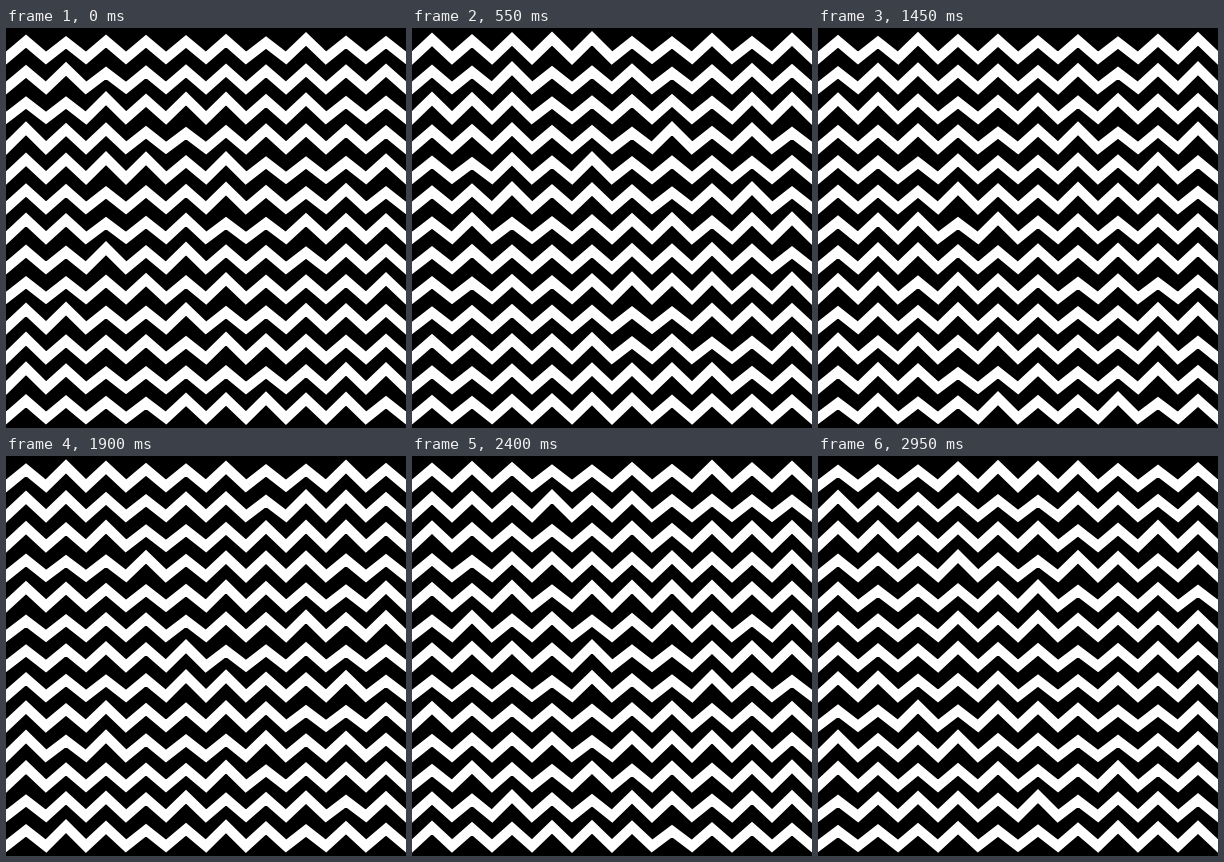
An HTML page that plays this animation: 400 by 400 pixels, repeating every 3000 ms.

```html
<!DOCTYPE html>
<html lang="en">
<head>
<meta charset="utf-8">
<title>Jittering zigzags</title>
<style>
  html, body { margin: 0; width: 100%; height: 100%; overflow: hidden; background: #000; }
  svg { display: block; width: 100%; height: 100%; }
  path { fill: none; stroke: #fff; stroke-width: 10; stroke-linejoin: miter; stroke-miterlimit: 10; }
</style>
</head>
<body>
<svg viewBox="0 0 400 400"><path id="zigzags"/></svg>
<script>
const LOOP = 3000, STEP = 50;
const ROWS = 13, ROW_GAP = 30;
const HALF_WAVE = 20, LAST_VERTEX = 21;
const VALLEY = 30, PEAK = 10, PEAK_JITTER = 5;
const zigzags = document.getElementById('zigzags');

// Repeatable random number in 0..1 for one peak at one step.
function random(step, row, vertex) {
  let h = Math.imul(step + 1, 374761393) ^ Math.imul(row + 1, 668265263) ^ Math.imul(vertex + 3, 1274126177);
  h = Math.imul(h ^ (h >>> 15), 2246822519);
  h = Math.imul(h ^ (h >>> 13), 3266489917);
  return ((h ^ (h >>> 16)) >>> 0) / 4294967296;
}

// Valleys stay fixed; every peak jumps to a new height at each step.
function zigzag(row, step) {
  const points = [];
  for (let vertex = -1; vertex <= LAST_VERTEX; vertex++) {
    const isPeak = vertex % 2 !== 0;
    const y = isPeak ? PEAK + PEAK_JITTER * random(step, row, vertex) : VALLEY;
    points.push(`${vertex * HALF_WAVE} ${(row * ROW_GAP + y).toFixed(2)}`);
  }
  return 'M' + points.join('L');
}

let shown = -1;

function draw(time) {
  const step = Math.floor((time % LOOP) / STEP);
  if (step === shown) return;
  shown = step;
  zigzags.setAttribute('d', Array.from({ length: ROWS }, (_, row) => zigzag(row, step)).join(''));
}

const start = performance.now();
function tick() {
  draw(performance.now() - start);
  requestAnimationFrame(tick);
}
tick();
</script>
</body>
</html>
```
